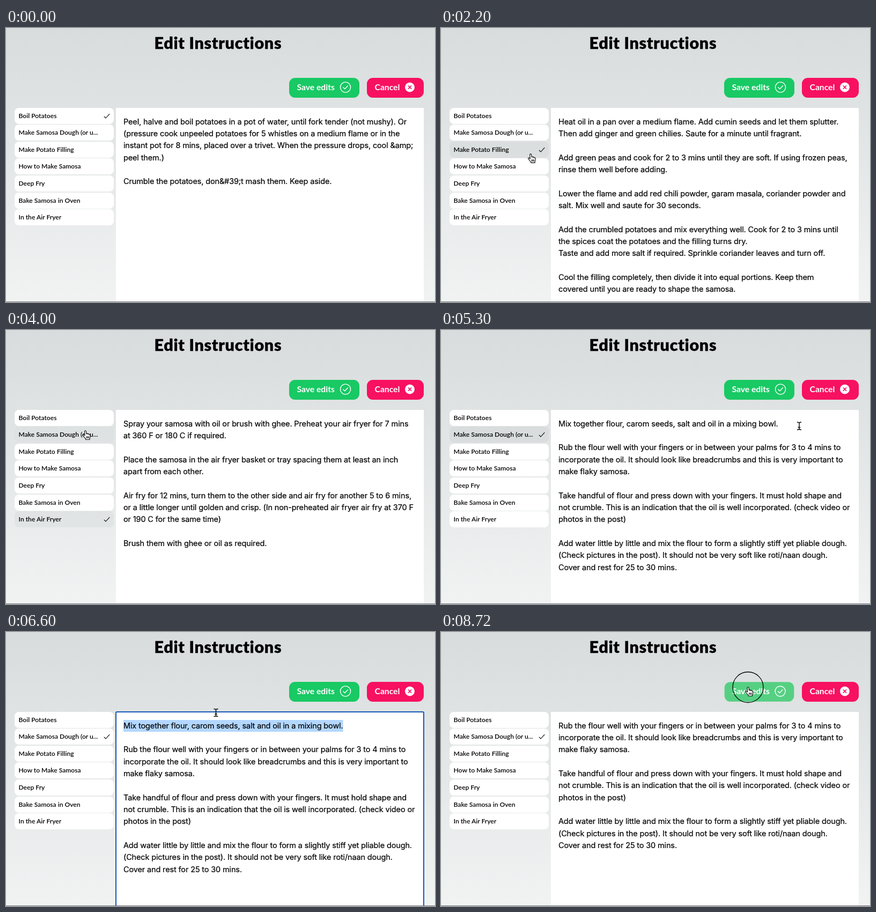
Recreate the animation shown at these times as an HTML page. Size 800 px wide and 511 px high, loop 8850 ms.

```html
<!DOCTYPE html>
<html lang="en">
<head>
<meta charset="utf-8">
<title>Edit Instructions</title>
<style>
html, body { margin: 0; width: 100%; height: 100%; overflow: hidden; }
#stage {
  position: relative; width: 800px; height: 511px; overflow: hidden; color: #000;
  background: linear-gradient(#d8dcdc, #f1f3f3);
  font-family: Lato, sans-serif;
}
#stage > * { position: absolute; box-sizing: border-box; }
h1 {
  margin: 0; left: 0; top: 8px; width: 790.8px; text-align: center; white-space: nowrap;
  font-size: 30.5px; font-weight: 900; line-height: 38px; letter-spacing: .7px;
  -webkit-text-stroke: .3px #000;
}
.btn {
  top: 93px; height: 37px; border-radius: 11px; padding-left: 14.5px;
  color: #fff; font-size: 15.7px; font-weight: 700; line-height: 34px; white-space: nowrap;
}
.btn svg { position: absolute; right: 15px; top: 7px; width: 22px; height: 22px; }
#save { left: 528px; width: 130.5px; background: #18c964; }
#save.hover { background: #55d082; }
#save.down { transform: scale(.99); }
#cancel { left: 673px; width: 106px; background: #f71160; }
.item {
  left: 16px; width: 184.5px; height: 30px; border-radius: 8px; padding-left: 7.5px;
  background: #fff; font-size: 12.1px; font-weight: 600; line-height: 29px; white-space: nowrap;
}
.item.hover { background: rgba(0, 0, 0, .012); }
.item.focus { background: rgba(0, 0, 0, .035); }
.item svg { position: absolute; right: 7px; top: 9px; width: 12px; height: 12px; display: none; }
.item.on svg { display: block; }
#box { left: 204px; top: 148px; width: 576px; height: 380px; border: 1px solid transparent; background: #fff padding-box; }
#box.focus { border: 2px solid #1558b8; border-radius: 3px; }
#text {
  left: 219px; top: 163.8px; white-space: pre;
  font: 14.5px/22.33px Inter, sans-serif; letter-spacing: -.14px;
  -webkit-text-stroke: .2px #000;
}
#first { display: inline-block; height: 22.33px; vertical-align: top; background: linear-gradient(#b3d7ff, #b3d7ff) right / 0 100% no-repeat; }
#caret { left: 219px; width: 1.5px; height: 19px; background: #000; }
#edge { left: 0; top: 510px; width: 800px; height: 1px; background: #77797a; }
#over { left: 0; top: 0; width: 800px; height: 511px; }
</style>
</head>
<body>
<div id="stage">
  <h1>Edit Instructions</h1>
  <div id="save" class="btn">Save edits
    <svg viewBox="0 0 22 22" fill="none" stroke="#fff" stroke-width="1.4" stroke-linecap="round" stroke-linejoin="round"><circle cx="11" cy="10.5" r="9.6"/><path d="M6.8 10.8l3 3 5.6-6"/></svg>
  </div>
  <div id="cancel" class="btn">Cancel
    <svg viewBox="0 0 22 22" stroke="#f71160" stroke-width="1.6" stroke-linecap="round"><circle cx="11" cy="10.5" r="9" fill="#fff" stroke="none"/><path d="M8.4 7.9l5.2 5.2m0-5.2l-5.2 5.2"/></svg>
  </div>
  <div id="box"></div>
  <div id="text"><span id="first"></span><div id="rest"></div></div>
  <div id="caret"></div>
  <div id="edge"></div>
  <svg id="over" viewBox="0 0 800 511" fill="none" stroke="#000">
    <circle id="ring" stroke-width="1.3"/>
    <g id="cursor" stroke-linejoin="round" stroke-linecap="round">
      <path id="hand" fill="#fff" stroke-width="1.1" d="M-1.4 1.2Q-1.3-.3 0-.2Q1.3-.1 1.5 1.4L2 6Q2.2 4.7 3.4 4.9Q4.5 5 4.6 6.4Q5 5.3 6 5.6Q7 5.9 7 7Q8.9 6.3 9 8.4V11Q8.9 13 8 14.2V16.3H.6V14.8Q-1.6 12.8-3.5 10Q-5.4 7.6-4 7Q-2.8 6.6-1 9ZM2.2 10.5V13.5M4.2 10.5V13.5M6.2 10.5V13.5"/>
      <path id="beam" stroke-width="1.4" d="M-3.5-7Q0-7 0-5.2Q0-7 3.5-7M0-5.2V5.2M-3.5 7Q0 7 0 5.2Q0 7 3.5 7M-1.8 2.5H1.8"/>
      <path id="arrow" fill="#000" stroke="#fff" d="M0 0V14L3.2 11L5.2 15.8L7.4 14.8L5.4 10.2H9.8Z"/>
    </g>
  </svg>
</div>
<script>
const LOOP = 8850, LAST = 8720, TICK = 100, LINE = 22.33;
const $ = id => document.getElementById(id);
const names = ['Boil Potatoes', 'Make Samosa Dough (or u...', 'Make Potato Filling',
  'How to Make Samosa', 'Deep Fry', 'Bake Samosa in Oven', 'In the Air Fryer'];

const boil = `Peel, halve and boil potatoes in a pot of water, until fork tender (not mushy). Or
(pressure cook unpeeled potatoes for 5 whistles on a medium flame or in the
instant pot for 8 mins, placed over a trivet. When the pressure drops, cool &amp;
peel them.)

Crumble the potatoes, don&#39;t mash them. Keep aside.`.split('\n');

const dough = `Mix together flour, carom seeds, salt and oil in a mixing bowl.

Rub the flour well with your fingers or in between your palms for 3 to 4 mins to
incorporate the oil. It should look like breadcrumbs and this is very important to
make flaky samosa.

Take handful of flour and press down with your fingers. It must hold shape and
not crumble. This is an indication that the oil is well incorporated. (check video or
photos in the post)

Add water little by little and mix the flour to form a slightly stiff yet pliable dough.
(Check pictures in the post). It should not be very soft like roti/naan dough.
Cover and rest for 25 to 30 mins.`.split('\n');

const filling = `Heat oil in a pan over a medium flame. Add cumin seeds and let them splutter.
Then add ginger and green chilies. Saute for a minute until fragrant.

Add green peas and cook for 2 to 3 mins until they are soft. If using frozen peas,
rinse them well before adding.

Lower the flame and add red chili powder, garam masala, coriander powder and
salt. Mix well and saute for 30 seconds.

Add the crumbled potatoes and mix everything well. Cook for 2 to 3 mins until
the spices coat the potatoes and the filling turns dry.
Taste and add more salt if required. Sprinkle coriander leaves and turn off.

Cool the filling completely, then divide it into equal portions. Keep them
covered until you are ready to shape the samosa.`.split('\n');

const air = `Spray your samosa with oil or brush with ghee. Preheat your air fryer for 7 mins
at 360 F or 180 C if required.

Place the samosa in the air fryer basket or tray spacing them at least an inch
apart from each other.

Air fry for 12 mins, turn them to the other side and air fry for another 5 to 6 mins,
or a little longer until golden and crisp. (In non-preheated air fryer air fry at 370 F
or 190 C for the same time)

Brush them with ghee or oil as required.`.split('\n');

// [time, value] steps
const chosen = [[0, 0], [1000, 1], [1800, 2], [2800, 6], [4500, 1]];
const pages = [[0, boil], [1000, dough], [1800, filling], [2800, air], [4500, dough],
  [6800, ['', ...dough.slice(1)]], [7600, dough.slice(1)], [7700, dough.slice(2)]];
const caretRow = [[0, -1], [6800, 0], [7000, 1], [7400, 2], [7600, 1], [7700, 0], [8200, -1]];
// [time, x, y] of the pointer tip
const path = [[100, 430, 505], [900, 166, 196], [1400, 166, 196], [1600, 167, 228], [1900, 168, 230],
  [2300, 167, 236], [2600, 164, 344], [2900, 164, 344], [3600, 155, 240], [4000, 148, 188], [4500, 150, 190],
  [4600, 166, 190], [5300, 668, 179], [5400, 639, 177], [6300, 206, 173], [6400, 206, 173],
  [6600, 391.5, 150.5], [7900, 391.5, 150.5], [8400, 572.5, 103], [LAST, 572.5, 103]];
const clicks = [1000, 1800, 4500, 5400, LAST];

const at = (steps, t) => steps.filter(s => s[0] <= t).pop()[1];
const inside = (p, x0, y0, x1, y1) => p.x >= x0 && p.x < x1 && p.y >= y0 && p.y < y1;

function pointer(t) {
  const i = Math.max(1, path.findIndex(k => k[0] >= t));
  const [t0, x0, y0] = path[i - 1], [t1, x1, y1] = path[i];
  const k = Math.max(0, (t - t0) / (t1 - t0));
  const e = k * k * (3 - 2 * k);
  return { x: x0 + (x1 - x0) * e, y: y0 + (y1 - y0) * e };
}

const items = names.map((name, i) => {
  const el = document.createElement('div');
  el.className = 'item';
  el.style.top = 148.5 + i * 31.6 + 'px';
  el.innerHTML = name + '<svg viewBox="0 0 12 12" fill="none" stroke="#000" stroke-width="1.1"><path d="M.8 6.8L4 10L11.2 2.2"/></svg>';
  $('stage').insertBefore(el, $('box'));
  return el;
});

function render(t) {
  const p = pointer(t), on = at(chosen, t), lines = at(pages, t), row = at(caretRow, t);
  const dragging = t >= 5400 && t < 6800;
  const shown = t >= 100 && !(t >= 6800 && t < 8000);
  const overList = shown && !dragging && inside(p, 16, 148, 201, 368);
  const overSave = shown && inside(p, 528, 93, 659, 130);

  items.forEach((el, i) => {
    el.classList.toggle('on', i === on);
    el.classList.toggle('hover', overList && Math.floor((p.y - 147.5) / 31.6) === i);
    el.classList.toggle('focus', i === on && t >= 1000 && t < 5500);
  });
  $('save').classList.toggle('hover', overSave);
  $('save').classList.toggle('down', t >= LAST);
  $('box').classList.toggle('focus', t >= 5400 && t < LAST);

  $('first').textContent = lines[0];
  $('rest').textContent = lines.slice(1).join('\n');
  const picked = dragging ? (t >= 6300 ? 600 : Math.max(0, 627 - p.x)) : 0;
  $('first').style.backgroundSize = picked + 'px 100%';
  $('caret').style.display = row < 0 ? 'none' : '';
  $('caret').style.top = 165.5 + row * LINE + 'px';

  const shape = overList || overSave ? 'hand' : dragging || inside(p, 204, 148, 780, 511) ? 'beam' : 'arrow';
  for (const id of ['hand', 'beam', 'arrow']) $(id).style.display = id === shape ? '' : 'none';
  $('cursor').style.display = shown ? '' : 'none';
  $('cursor').setAttribute('transform', `translate(${p.x} ${p.y})`);

  // a press shows a small ring, which widens once on release
  const start = clicks.find(c => t >= c && t < c + 2 * TICK);
  const wide = t - start >= TICK;
  const ring = $('ring'), spot = pointer(start || 0);
  ring.style.display = start === undefined || (wide && dragging) ? 'none' : '';
  ring.setAttribute('cx', spot.x);
  ring.setAttribute('cy', spot.y);
  ring.setAttribute('r', wide ? 87 : 28.5);
  ring.style.opacity = wide ? .3 : 1;
}

let origin;
function frame(now) {
  origin ??= now;
  const t = (now - origin) % LOOP;
  render(t >= LAST ? LAST : Math.floor(t / TICK) * TICK);
  requestAnimationFrame(frame);
}
render(0);
requestAnimationFrame(frame);
</script>
</body>
</html>
```
